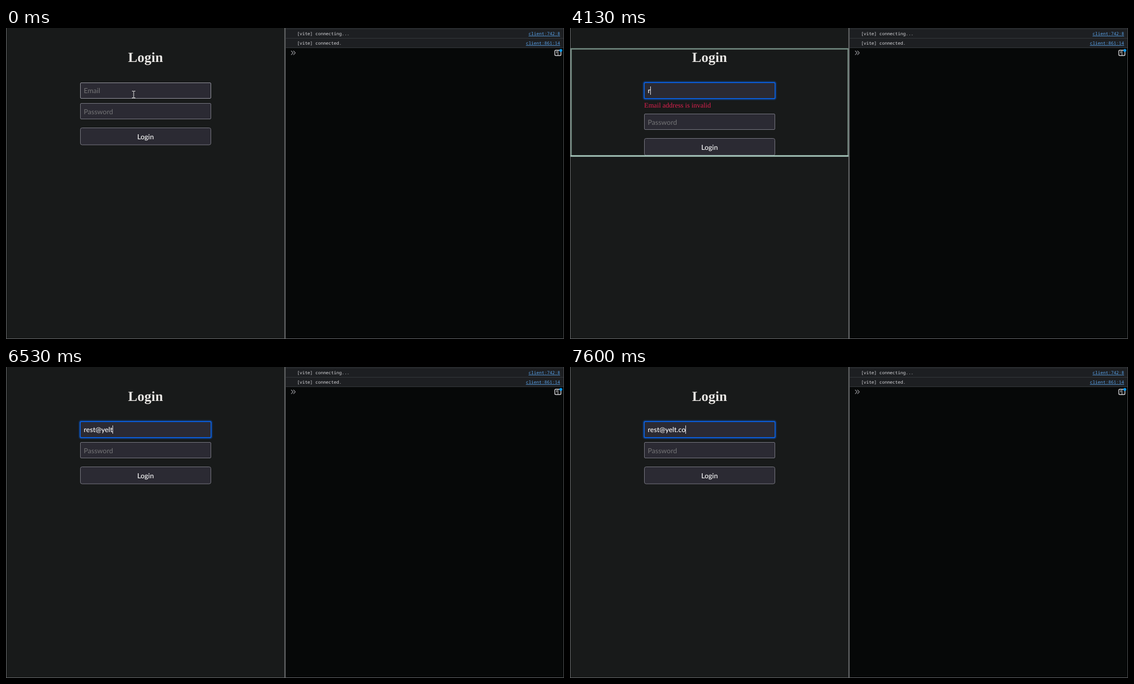
An HTML page that plays this animation: 1001x559 px, repeating every 8000 ms.

```html
<!DOCTYPE html>
<html lang="en">
<head>
<meta charset="utf-8">
<title>Login form</title>
<style>
  html, body { margin: 0; height: 100%; overflow: hidden; background: #181a1b; }
  svg { display: block; text-rendering: geometricPrecision; }
  .ui { font: 500 12.5px Lato, "Open Sans", sans-serif; fill: #fff; }
  .hint { fill: #747476; font-weight: 400; }
  .serif { font: 12.5px "Liberation Serif", serif; }
  .box { fill: #2b2a33; stroke: #75757f; }
  .log { font: 7.875px "Noto Sans Mono", monospace; fill: #d7d7db; }
  .link { fill: #5ba4ec; text-anchor: end; text-decoration: underline; }
  .mid { text-anchor: middle; }
</style>
</head>
<body>
<svg width="1001" height="559" viewBox="0 0 1001 559">
  <!-- page -->
  <rect width="500" height="559" fill="#181a1a"/>
  <text class="mid" x="250.3" y="61" fill="#e8e6e3" style="font:bold 25px 'Liberation Serif',serif">Login</text>
  <rect id="email" class="box" x="133.5" y="98.5" width="234" height="28" rx="1.5"/>
  <g id="ring" fill="none" stroke="#0b5cd6">
    <rect x="132" y="97" width="237" height="31" rx="3" stroke-width="4" opacity=".25"/>
    <rect x="133" y="98" width="235" height="29" rx="2" stroke-width="1.8"/>
  </g>
  <text id="emailHint" class="ui hint" x="139.5" y="117">Email</text>
  <text id="value" class="ui" x="139.5" y="117"></text>
  <rect id="caret" y="105" width="1" height="15" fill="#e4e4e8"/>
  <text id="error" class="serif" x="133" y="142.5" fill="#dc214f">Email address is invalid</text>
  <g id="rest">
    <rect class="box" x="133.5" y="135.5" width="234" height="28" rx="1.5"/>
    <text class="ui hint" x="139.5" y="154.5">Password</text>
    <rect class="box" x="133.5" y="179.5" width="234" height="30.5" rx="3"/>
    <text class="ui mid" x="250.3" y="199.5">Login</text>
  </g>
  <path id="pointer" d="M226 113.5h2.5l.5 .5l.5 -.5h2.5M229 114v11M226 125.5h2.5l.5 -.5l.5 .5h2.5" fill="none" stroke="#e6e6e6"/>
  <g id="flash" fill="none" stroke-width="2.4">
    <rect id="frame" x="2" y="37.5" width="497"/>
    <path id="base"/>
  </g>

  <!-- console -->
  <rect x="500" width="501" height="559" fill="#060808"/>
  <rect x="502" width="498" height="35" fill="#1d1f22"/>
  <path d="M502 1.5h498M502 18.5h498M502 35.5h498" stroke="#33363a"/>
  <g class="log">
    <text x="522" y="13">[vite] connecting...</text>
    <text x="522" y="30">[vite] connected.</text>
    <text class="link" x="994" y="13">client:742:8</text>
    <text class="link" x="994" y="30">client:861:14</text>
  </g>
  <path d="M511.5 41l3.5 3.7l-3.5 3.7M515.5 41l3.5 3.7l-3.5 3.7" fill="none" stroke="#8f8f94" stroke-width="1.2"/>
  <rect x="984.5" y="40" width="11" height="9.5" rx="1.8" fill="none" stroke="#d0d0d4" stroke-width="1.4"/>
  <path d="M990.2 40v9.5M987 42.5h2M987 44.5h2" stroke="#d0d0d4"/>
  <circle cx="995.3" cy="40.3" r="2.6" fill="#0a9bf5"/>

  <!-- window edges -->
  <path d="M.5 0V559M0 558.5H1001" stroke="#66686a"/>
  <path d="M500.5 0V559" stroke="#6c6e70" stroke-width="2"/>
  <path d="M1000.5 0V559" stroke="#4a4c4e"/>
</svg>
<script>
const LOOP = 8000, FOCUS = 400, CLICK = 1000, TYPE = 4000;
const BLINK = 1200, CARET_ON = 750, FLASH = 400, ERROR_ROW = 19;
const address = 'rest@yelt.co';
// one key press per character
const keys = [4130, 4200, 4270, 4270, 4330, 4670, 4930, 5000, 5270, 6730, 7000, 7200];

const $ = id => document.getElementById(id);
const show = (id, on) => $(id).style.display = on ? '' : 'none';
const set = (id, attrs) => Object.entries(attrs).forEach(([k, v]) => $(id).setAttribute(k, v));
const mix = (a, b, k) => `rgb(${a.map((v, i) => v + (b[i] - v) * k)})`;

function draw(t) {
  const count = keys.filter(k => k <= t).length;
  const text = address.slice(0, count);
  const idle = t - (keys[count - 1] ?? CLICK);
  $('value').textContent = text;
  show('emailHint', !text);
  show('pointer', t < TYPE);

  $('email').style.stroke = t < FOCUS ? '#92929c' : '';
  show('ring', t >= FOCUS);

  const width = text ? $('value').getComputedTextLength() : 0;
  set('caret', { x: Math.floor(139.5 + width) });
  show('caret', idle >= 0 && idle % BLINK < CARET_ON);

  const invalid = text && !/@\w{4}(\.\w+)?$/.test(text);
  show('error', invalid);
  set('rest', { transform: `translate(0 ${invalid ? ERROR_ROW : 0})` });

  // the outline warms with each key of a burst and shrinks once the domain is whole
  const warmth = count % 9 / 8;
  const bottom = /\.\w/.test(text) ? 230 - ERROR_ROW : 230;
  show('flash', text && idle < FLASH);
  set('frame', { height: bottom - 37.5, stroke: mix([112, 142, 134], [150, 138, 116], warmth) });
  set('base', { d: `M1 ${bottom}H500`, stroke: mix([163, 205, 195], [222, 200, 177], warmth) });
}

let start;
function tick(now) {
  start ??= now;
  draw((now - start) % LOOP);
  requestAnimationFrame(tick);
}
draw(0);
requestAnimationFrame(tick);
</script>
</body>
</html>
```
